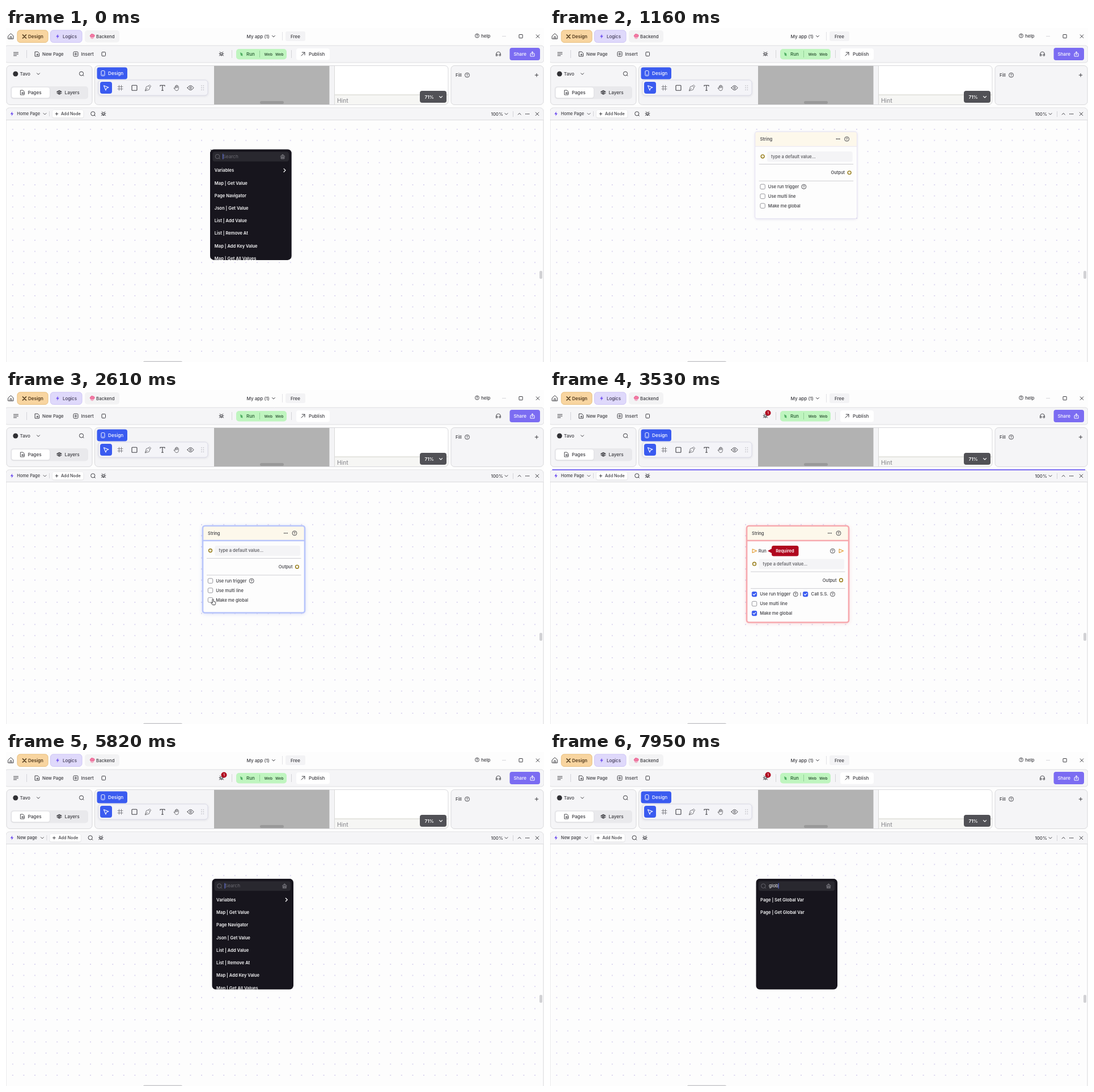
Recreate the animation shown at these times as an HTML page with a canvas. Size 949x590 px, loop 7.99 s.

```html
<!DOCTYPE html>
<html lang="en">
<head>
<meta charset="utf-8">
<title>Node editor</title>
<style>
html, body { margin: 0; width: 100%; height: 100%; overflow: hidden; background: #fdfdfd; }
canvas { display: block; width: 949px; height: 590px; }
</style>
</head>
<body>
<canvas id="stage"></canvas>
<script>
const W = 949, H = 590, LOOP = 7990;
const canvas = document.getElementById('stage');
const c = canvas.getContext('2d');
const dpr = window.devicePixelRatio || 1;
canvas.width = W * dpr;
canvas.height = H * dpr;

const INK = '#3d3d42', BLUE = '#3a5bf0', RED = '#b0081f', GOLD = '#92770f', ORANGE = '#e39a2d';

// Drawing helpers
function text(s, x, y, size = 8, weight = 500, color = INK, family = 'Inter, sans-serif') {
  c.font = `${weight} ${size}px ${family}`;
  c.fillStyle = color;
  c.fillText(s, x, y + size * 0.36);
}
function box(x, y, w, h, r, fill, stroke, lw = 1) {
  c.beginPath();
  c.roundRect(x, y, w, h, r);
  if (fill) { c.fillStyle = fill; c.fill(); }
  if (stroke) { c.strokeStyle = stroke; c.lineWidth = lw; c.stroke(); }
}
function shadowBox(x, y, w, h, r, fill, color, blur, dy = 1) {
  c.save();
  c.shadowColor = color;
  c.shadowBlur = blur * dpr;
  c.shadowOffsetY = dy * dpr;
  box(x, y, w, h, r, fill);
  c.restore();
}
function line(x1, y1, x2, y2, color = '#d4d4d8', lw = 1) {
  c.beginPath();
  c.moveTo(x1, y1);
  c.lineTo(x2, y2);
  c.strokeStyle = color;
  c.lineWidth = lw;
  c.stroke();
}
function ring(x, y, r, color, lw = 1, fill) {
  c.beginPath();
  c.arc(x, y, r, 0, 7);
  if (fill) { c.fillStyle = fill; c.fill(); }
  if (color) { c.strokeStyle = color; c.lineWidth = lw; c.stroke(); }
}
function icon(d, x, y, stroke = INK, lw = 1, fill) {
  const p = new Path2D(d);
  c.save();
  c.translate(x, y);
  c.lineCap = c.lineJoin = 'round';
  if (fill) { c.fillStyle = fill; c.fill(p); }
  if (stroke) { c.strokeStyle = stroke; c.lineWidth = lw; c.stroke(p); }
  c.restore();
}
const chevron = (x, y, color, lw) => icon('M-2.5-1.2L0 1.3L2.5-1.2', x, y, color, lw);
const cross = (x, y) => icon('M-2.8-2.8L2.8 2.8M2.8-2.8L-2.8 2.8', x, y);
const plus = (x, y, r = 2.8) => icon(`M${-r} 0H${r}M0 ${-r}V${r}`, x, y);
function search(x, y, color = INK, r = 3.6) {
  ring(x, y, r, color);
  line(x + r * 0.7, y + r * 0.7, x + r + 0.8, y + r + 0.8, color);
}
function help(x, y, r = 4) {
  ring(x, y, r, INK, 0.9);
  icon('M-1.2-.8Q-1-2 0-2Q1.3-1.9 1.2-.8Q1-.2 0 .4V.8M0 2V2.1', x, y, INK, 0.8);
}
function bug(x, y) {
  icon('M-2-1.8Q0-3.4 2-1.8V1.6Q0 4.6-2 1.6ZM-1.6-2.8L-2.8-4M1.6-2.8L2.8-4M-2-.8H-4M2-.8H4M-2 1.6L-3.8 3M2 1.6L3.8 3M-1 .2H1M-1 1.8H1', x, y, INK, 0.9);
}
function dots3(x, y) {
  for (let i = -1; i < 2; i++) ring(x + i * 2.6, y, 0.9, null, 0, INK);
}
const bolt = (x, y) => icon('M.8-4L-2.8 .7H-.4L-.8 4L2.8-.9H.4Z', x, y, null, 0, '#6f50f0');
const house = 'M-4-.2L0-4L4-.2M-3-1V4H3V-1M-.8 4V1.4H.8V4';

function topBar() {
  icon('M-4.5-.6L0-4.8L4.5-.6V4.6H-4.5ZM-1.4 4.6V1H1.4V4.6', 8.5, 14.5);
  box(20, 4, 54, 21.5, 5, '#f8d5a0', '#e8bd79');
  icon('M-3-3L3 3M3-3L-3 3', 32.5, 15, '#51391c', 1.7);
  text('Design', 39, 14.7, 8, 600, '#51391c');
  box(78.5, 4, 55.5, 21.5, 5, '#dfd9fb', '#cdc4f6');
  bolt(91, 14.7);
  text('Logics', 100, 14.7, 7.9, 500, '#403a55');
  box(139, 4, 61, 21.5, 5, '#f3f3f4');
  icon('M-3 1Q-5-.5-3-2Q-1.6-5 1.2-3.4Q4.8-3 4 .2Q3.6 1 2.6 1ZM-2 2.2V3.4M0 2.2V4.4M2 2.2V3.4', 152, 14.5, '#ec5c8d', 1, '#f27ba4');
  text('Backend', 159, 14.7, 7.9);
  text('My app (1)', 424.5, 14.7, 8.1);
  chevron(472, 14.7);
  line(487.5, 7, 487.5, 22, '#e2e2e5');
  box(493, 6, 35, 17, 3, '#f3f3f5');
  text('Free', 502, 14.7, 8);
  help(831, 13.7, 3.5);
  text('help', 838, 13.7, 8);
  line(875, 14.7, 882, 14.7);
  box(905, 11.5, 6.2, 6.2, 0.5, null, INK);
  cross(938, 14.7);
}

function toolBar() {
  box(-2, 31, 951, 30, 5, '#f5f5f7', '#dedee1');
  icon('M-4-2.8H4M-4 0H4M-4 2.8H1', 17.5, 46);
  line(36.5, 39, 36.5, 53);
  icon('M-3.5-4H1L3.5-1.5V4H-3.5ZM-1 1H1.6M.3-.3V2.3', 55, 46);
  text('New Page', 64, 46, 7.8);
  box(119, 42, 8, 8, 1.5, null, INK);
  plus(123, 46, 2);
  text('Insert', 132.5, 46, 8.1);
  box(169, 42.5, 6.5, 7, 1, null, INK);
  bug(380, 46);
  line(398.5, 39, 398.5, 53);
  box(406, 37, 89, 18.5, 5, '#bff5bf');
  icon('M-2-3.5L2-1.5L2.5 3L-1 2Z', 415, 46.5, null, 0, '#55b267');
  text('Run', 424, 46, 8.1, 500, '#255a30');
  line(447.5, 40, 447.5, 52, '#92cf97');
  text('Web', 455.5, 46.2, 6.7, 600, '#34583a');
  text('Web', 475, 46.2, 6.7, 600, '#34583a');
  line(503.5, 39, 503.5, 53);
  box(512, 36, 59, 20.5, 4, '#fff');
  icon('M-3 3L3-3M-1.8-3H3V1.8', 524, 46);
  text('Publish', 534, 46, 8.1);
  icon('M-4 3V0Q-3.5-4 0-4Q3.5-4 4 0V3H1.5V.4H4M-4 .4H-1.5V3H-4', 868.5, 46, INK, 0.9);
  box(888.5, 35, 53.5, 22, 4, '#7b6cf2');
  text('Share', 895.5, 46, 8.1, 500, '#fff');
  icon('M-1.5-.8H-3.5V4H3.5V-.8H1.5M0 1.5V-4M-2-2L0-4.2L2-2', 928.5, 46, '#fff');
}

function designTools() {
  shadowBox(163, 92, 193, 27, 5, '#f4f4f8', 'rgba(60,60,90,.14)', 4);
  box(163, 92, 193, 27, 5, null, '#d5d5e2', 0.8);
  box(160.5, 69.5, 53.5, 21, 4, BLUE);
  box(168, 75.5, 6, 9, 1.4, null, '#fff');
  line(170, 82.5, 172, 82.5, '#fff', 0.8);
  text('Design', 180, 80, 8.2, 500, '#fff');
  box(166, 95, 21, 21, 4, BLUE);
  icon('M-4-4L4.4-.6L.8.8L-.6 4.4Z', 176.5, 105.7, '#fff', 1.1);
  icon('M-2-4.5V4.5M2-4.5V4.5M-4.5-2H4.5M-4.5 2H4.5', 201.5, 105.7, '#77777c', 0.9);
  box(222, 101.2, 9, 9, 1, null, INK, 1.1);
  icon('M-5 5L-3-2L1-3.5L3.5-1L2 3ZM1-3.5L3-5.2L5.2-3L3.5-1M-5 5L-1 .8', 250.5, 105.7, '#69696e', 0.9);
  icon('M-4-3V-4.5H4V-3M0-4.5V4.5M-1.5 4.5H1.5', 276, 105.7, INK, 1.1);
  icon('M-3 1V-2.5Q-2.2-3.6-1.5-2.5V-4Q-.7-5.2 0-4V-4.3Q.8-5.3 1.6-4V-3Q2.6-4 3.4-2.6V2Q2.6 5.2 0 5Q-2 4.8-3.2 3L-5 .4Q-4.4-.8-3 1M-1.5-2.5V0M0-4V0M1.6-3V0', 301, 105.7, '#69696e', 0.9);
  icon('M-5.5 0Q0-8 5.5 0Q0 8-5.5 0Z', 325.5, 105.7);
  ring(325.5, 105.7, 1.6, INK);
  for (let i = 0; i < 6; i++) ring(345 + (i % 2) * 3.4, 102 + (i >> 1) * 3.6, 0.8, null, 0, '#b2b2b8');
}

function panels() {
  box(1, 66.5, 151, 69, 6, '#f5f5f7', '#d9d9dc');
  ring(16.8, 81, 4.5, null, 0, '#303034');
  text('Tavo', 24.5, 81, 8);
  chevron(57, 81);
  search(133, 80.6);
  box(8, 103, 137, 22.5, 5, '#e9e9ec');
  shadowBox(10, 105, 67, 18.5, 4, '#fff', 'rgba(0,0,0,.12)', 2, 0.5);
  icon('M-3.2-4H1L3.2-1.8V4H-3.2ZM-1.2 1H3.8M1-.8L-1.2 1L1 2.6', 29, 114, INK, 0.9);
  text('Pages', 38.5, 114.2, 8.2);
  icon('M-4.2-1.5L0-3.8L4.2-1.5L0 .8ZM-4.2 1L0 3.4L4.2 1', 94, 114, INK, 1, '#77777b');
  text('Layers', 103.5, 114.2, 8.2);

  c.save();
  c.beginPath();
  c.roundRect(156.5, 66.5, 623.5, 69, 6);
  c.clip();
  c.fillStyle = '#f4f4f6';
  c.fillRect(156, 66, 625, 70);
  c.fillStyle = '#b2b2b2';
  c.fillRect(367, 66, 203.5, 70);
  box(448, 129, 42, 5, 2.5, '#999');
  c.fillStyle = '#fff';
  c.fillRect(580, 66, 201, 52);
  box(579.5, 118, 210, 25, 1, '#f6f6f4', '#d0d0c9');
  line(579.5, 66, 579.5, 136, '#d9d9d9');
  text('Hint', 584, 128.5, 10.7, 400, '#85858a', 'Roboto, sans-serif');
  c.restore();
  box(156.5, 66.5, 623.5, 69, 6, null, '#d9d9dc');
  designTools();
  box(730, 111, 47, 21, 4, '#515156');
  text('71%', 738.5, 121.8, 8.1, 600, '#fff');
  chevron(767, 121.8, '#fff', 1.2);

  box(785, 66.5, 163, 69, 6, '#f5f5f7', '#d9d9dc');
  text('Fill', 793, 83.2, 8);
  help(813.5, 83.2);
  plus(936, 83.2);
}

function logicPanel(t) {
  const home = t < 4240, shift = home ? 0 : -4.6;
  box(0, 141, 948, 460, 6, '#fdfdfd', '#d9d9dc');
  c.fillStyle = '#dcd7f0';
  for (let y = 179; y < H; y += 19.6)
    for (let x = 11.8; x < 945; x += 19.6) c.fillRect(x - 1, y - 1, 2, 2);
  box(0.5, 141.5, 947, 21, [6, 6, 0, 0], '#f5f5f7');
  line(0, 162.5, 948, 162.5, '#dadadd');
  if (t >= 3480 && t < 3600) line(4, 141, 944, 141, '#7c6df3', 1.8);
  bolt(10.5, 151.6);
  text(home ? 'Home Page' : 'New page', 19.3, 151.5, 7.4);
  chevron(68.5 + shift, 151.7, INK, 0.9);
  line(76.5 + shift, 147, 76.5 + shift, 156);
  shadowBox(82 + shift, 145, 54.5, 13.5, 3, '#fff', 'rgba(0,0,0,.15)', 2, 0.5);
  plus(89.5 + shift, 151.7, 2.3);
  text('Add Node', 97 + shift, 151.8, 7.3);
  search(153.3 + shift, 151.3);
  bug(172 + shift, 151.7);
  text('100%', 855.5, 151.8, 7.9);
  chevron(882.5, 151.8);
  line(894.5, 147, 894.5, 157);
  icon('M-2.5 1.2L0-1.3L2.5 1.2', 905.7, 151.8);
  dots3(919.7, 151.8);
  cross(937, 151.8);
  box(941, 429, 5, 14, 2, '#d2d2d5');
  box(242, 588.5, 69, 4, 2, '#c8c8cb');
}

function check(x, y, on) {
  box(x - 4.2, y - 4.2, 8.4, 8.4, 2, on ? BLUE : '#fff', on ? BLUE : '#89898f', 0.9);
  if (on) icon('M-2.2 0L-.6 1.7L2.3-1.6', x, y, '#fff', 1.2);
}
const port = (x, y) => icon('M-3.4-3.2L4 0L-3.4 3.2Z', x, y, ORANGE, 1.1);

// String node; x, y is its top left corner
function node(x, y, t) {
  const run = t >= 3080, lit = t >= 1480;
  const edge = run ? '#f7a9ae' : lit ? '#b8c5fb' : '#e8e5f4';
  const h = run ? 170.5 : 153.5, w = 180, drop = run ? 23.6 : 0;
  const at = (s, dx, dy, weight = 500) => text(s, x + dx, y + dy, 7.55, weight);
  shadowBox(x, y, w, h, 4, '#fdfdfd', run ? 'rgba(225,90,100,.3)' : lit ? 'rgba(90,110,230,.3)' : 'rgba(90,80,160,.18)', lit ? 7 : 4);
  box(x, y, w, 26, [4, 4, 0, 0], '#fdf8eb');
  line(x, y + 26, x + w, y + 26, edge, lit ? 2.5 : 1);
  box(x, y, w, h, 4, null, edge, lit ? 2.6 : 1.2);
  at('String', 9, 12.8);
  dots3(x + 146.5, y + 12.8);
  help(x + 162, y + 12.9);

  if (run) {
    port(x + 13.5, y + 44.3);
    at('Run', 20.8, 44.3);
    icon('M8 -4.5L0 0L8 4.5Z', x + 37, y + 44.2, null, 0, RED);
    box(x + 44, y + 35, 47.5, 18.5, 3.5, RED);
    text('Required', x + 51.2, y + 44.2, 7.5, 600, '#fff');
    help(x + 151.5, y + 44.3);
    port(x + 166.5, y + 44.3);
  }
  const yd = y + drop;
  ring(x + 13.5, yd + 43.6, 2.9, GOLD, 1.4, '#fff');
  box(x + 21.5, yd + 35, 150.5, 18, 3, '#f4f4f6');
  text('type a default value...', x + 28.5, yd + 43.6, 7.6, 500, '#55555a');
  line(x + 7, yd + 57.4, x + 173.5, yd + 57.4, '#c9c9ce', 0.9);
  at('Output', 133.8, yd - y + 72.3);
  ring(x + 166.5, yd + 72.3, 2.9, GOLD, 1.4, '#fff');
  line(x + 7, yd + 87, x + 173.5, yd + 87, '#c9c9ce', 0.9);
  ['Use run trigger', 'Use multi line', 'Make me global'].forEach((s, i) => {
    const dy = 97.1 + drop + i * 16.9;
    check(x + 13.5, y + dy, i === 0 && run || i === 2 && t >= 2720);
    at(s, 23.2, dy);
  });
  help(x + 86.2, yd + 97.1);
  if (run) {
    line(x + 95, yd + 94, x + 95, yd + 100, INK, 0.8);
    check(x + 103.6, yd + 97.1, true);
    at('Call S.S.', 113.6, 97.1 + drop);
    help(x + 151.5, yd + 97.1);
  }
}

const ALL = ['Variables', 'Map | Get Value', 'Page Navigator', 'Json | Get Value', 'List | Add Value',
  'List | Remove At', 'Map | Add Key Value', 'Map | Get All Values'];
const SOME = ['Logical Operators', 'String | To Lower Case', 'Social Logout', 'Page | Set Global Var',
  'Page | Get Global Var', 'Page | Build Context', 'String | Last Index Of', 'QN Storage | File'];

function menu(x, y, query, items, caret) {
  c.save();
  c.beginPath();
  c.roundRect(x, y, 143.7, 195.7, 7);
  c.clip();
  c.fillStyle = '#17151d';
  c.fillRect(x, y, 144, 196);
  box(x + 4.5, y + 4.5, 134.5, 17, 4, '#29282f');
  search(x + 13, y + 12.8, '#65646c', 3.8);
  icon(house, x + 128, y + 12.8, '#68676e', 1, '#68676e');
  text(query || 'Search', x + 22.6, y + 12.6, 8.2, 400, query ? '#f2f2f4' : '#6c6b73');
  const end = x + 22.8 + (query ? c.measureText(query).width : 0);
  if (caret) line(end, y + 8, end, y + 17.5, '#6678ee', 1.1);
  items.forEach((s, i) => text(s, x + 7.8, y + 37.4 + i * 22.23, 7.6, 600, '#f7f7f8'));
  if (items.length > 2) icon('M-1.4-2.8L1.5 0L-1.4 2.8', x + 131.5, y + 37.2, '#fff', 1.3);
  c.restore();
}

// Pointer keys: time, x, y
const PATH = [[1240, 400, 215], [1440, 430, 196], [1520, 430, 196], [2080, 415.5, 253], [2160, 415.5, 253],
  [2480, 365, 370], [2740, 365, 370], [3000, 361, 337], [3120, 361, 337], [3480, 300, 142], [3600, 250, 142],
  [3920, 60, 151], [4260, 60, 151], [4640, 197, 231], [4860, 197, 231], [5340, 363, 224], [5440, 363, 224]];
const ease = u => u * u * (3 - 2 * u);

function pointer(t) {
  const i = PATH.findIndex(k => k[0] > t);
  if (i < 1 || t >= 3480 && t < 3600) return;
  const [t0, x0, y0] = PATH[i - 1], [t1, x1, y1] = PATH[i];
  const u = ease((t - t0) / (t1 - t0));
  const x = x0 + (x1 - x0) * u, y = y0 + (y1 - y0) * u;
  if (t > 2440 && t < 3160)
    icon('M-1 0Q0-1.4 1 0V3.4L4.4 4.4Q5.2 5 4.6 7.4L3.8 9.6H-.6L-3.4 5.8Q-3.2 4.4-1 6Z', x, y, INK, 1, '#fff');
  else
    icon('M0 0V9L2 7.2L3.5 10.2L5 9.4L3.5 6.6H6Z', x, y, '#fff', 0.6, '#3a3a3c');
}

const KEYS = [[6500, 'g'], [6620, 'gl'], [6740, 'glo'], [7600, 'glob']];

function draw(t) {
  c.setTransform(dpr, 0, 0, dpr, 0, 0);
  c.fillStyle = '#fdfdfd';
  c.fillRect(0, 0, W, H);
  topBar();
  toolBar();
  panels();
  logicPanel(t);
  if (t >= 3080) {
    ring(384.5, 40.5, 5, null, 0, RED);
    text('1', 383.2, 40.5, 6.5, 500, '#fff');
  }
  if (t < 920) {
    line(361, 215, 363, 217, INK, 1.5);
    menu(360, 214.2, '', ALL, t % 1000 < 500);
  } else if (t < 4240) {
    const u = ease(Math.min(1, Math.max(0, (t - 1520) / 560)));
    node(361.6 - 14.6 * u, 183.2 + 56.8 * u, t);
  } else if (t >= 5440) {
    const [since, query] = KEYS.filter(k => k[0] <= t).pop() || [5440, ''];
    const items = query === 'glob' ? SOME.slice(3, 5) : query ? SOME : ALL;
    menu(363.3, 223.8, query, items, (t - since) % 1000 < 500);
  }
  pointer(t);
}

const start = performance.now();
function frame() {
  draw((performance.now() - start) % LOOP);
  requestAnimationFrame(frame);
}
frame();
</script>
</body>
</html>
```
